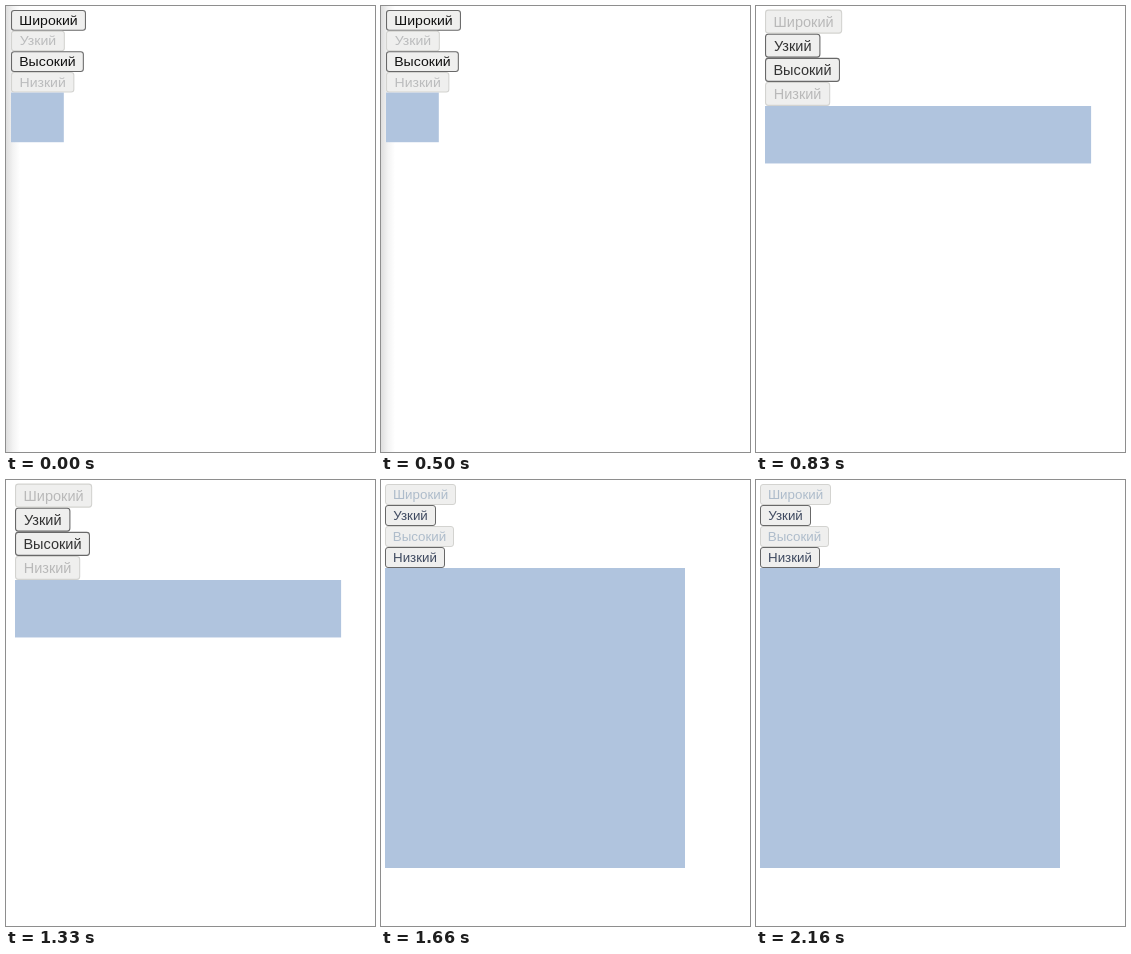
Recreate the animation shown at these times as an HTML page. Size 369x446 px, loop 2490 ms.

```html
<!DOCTYPE html>
<html lang="ru">
<head>
<meta charset="utf-8">
<title>Размеры блока</title>
<style>
  html, body { margin: 0; width: 100%; height: 100%; overflow: hidden; background: #fff; }
  svg { display: block; }
  text { font: 13.333px Arial, "Liberation Sans", sans-serif; text-anchor: middle; }
</style>
</head>
<body>
<svg id="stage" width="369" height="446" viewBox="0 0 369 446">
  <defs>
    <linearGradient id="edge">
      <stop offset="0" stop-color="#dedede"/>
      <stop offset=".5" stop-color="#f3f3f3"/>
      <stop offset="1" stop-color="#fff"/>
    </linearGradient>
  </defs>
</svg>
<script>
const STEP = 830;
const ROW = 21;
const BUTTONS = [['Широкий', 71], ['Узкий', 51], ['Высокий', 69], ['Низкий', 60]];

// Each scene: page offset and zoom, block size, enabled buttons, text colours.
const SCENES = [
  { at: [5, 4], zoom: [1.056, .983], box: [50, 50.5], on: [0, 2], ink: '#111', dim: '#bbbcbd', shade: true },
  { at: [9, 3.5], zoom: [1.087, 1.149], box: [300, 50], on: [1, 2], ink: '#333', dim: '#b9b9b9' },
  { at: [4, 4], zoom: [1, 1], box: [300, 300], on: [1, 3], ink: '#3f4a60', dim: '#aebccb' }
];

const stage = document.getElementById('stage');

function add(parent, tag, attrs, label) {
  const el = document.createElementNS('http://www.w3.org/2000/svg', tag);
  for (const key in attrs) el.setAttribute(key, attrs[key]);
  if (label) el.textContent = label;
  return parent.appendChild(el);
}

function drawButton(page, [label, width], row, enabled, scene) {
  const y = row * ROW;
  add(page, 'rect', {
    x: .5, y: y + .5, width: width - 1, height: ROW - 1, rx: 2.5,
    fill: '#efefee', stroke: enabled ? '#686868' : '#d3d3d0'
  });
  add(page, 'text', { x: width / 2, y: y + 15, fill: enabled ? scene.ink : scene.dim }, label);
}

function drawScene(scene) {
  const group = add(stage, 'g', {});
  if (scene.shade) add(group, 'rect', { width: 14, height: 446, fill: 'url(#edge)' });
  const page = add(group, 'g', { transform: `translate(${scene.at}) scale(${scene.zoom})` });
  BUTTONS.forEach((button, row) => drawButton(page, button, row, scene.on.includes(row), scene));
  add(page, 'rect', {
    y: BUTTONS.length * ROW, width: scene.box[0], height: scene.box[1], fill: '#b0c4de'
  });
  return group;
}

SCENES.forEach((scene, i) => {
  const frames = SCENES.map((_, k) => ({
    visibility: k === i ? 'visible' : 'hidden',
    offset: k / SCENES.length,
    easing: 'step-end'
  }));
  frames.push({ ...frames[frames.length - 1], offset: 1 });
  drawScene(scene).animate(frames, { duration: STEP * SCENES.length, iterations: Infinity });
});
</script>
</body>
</html>
```
